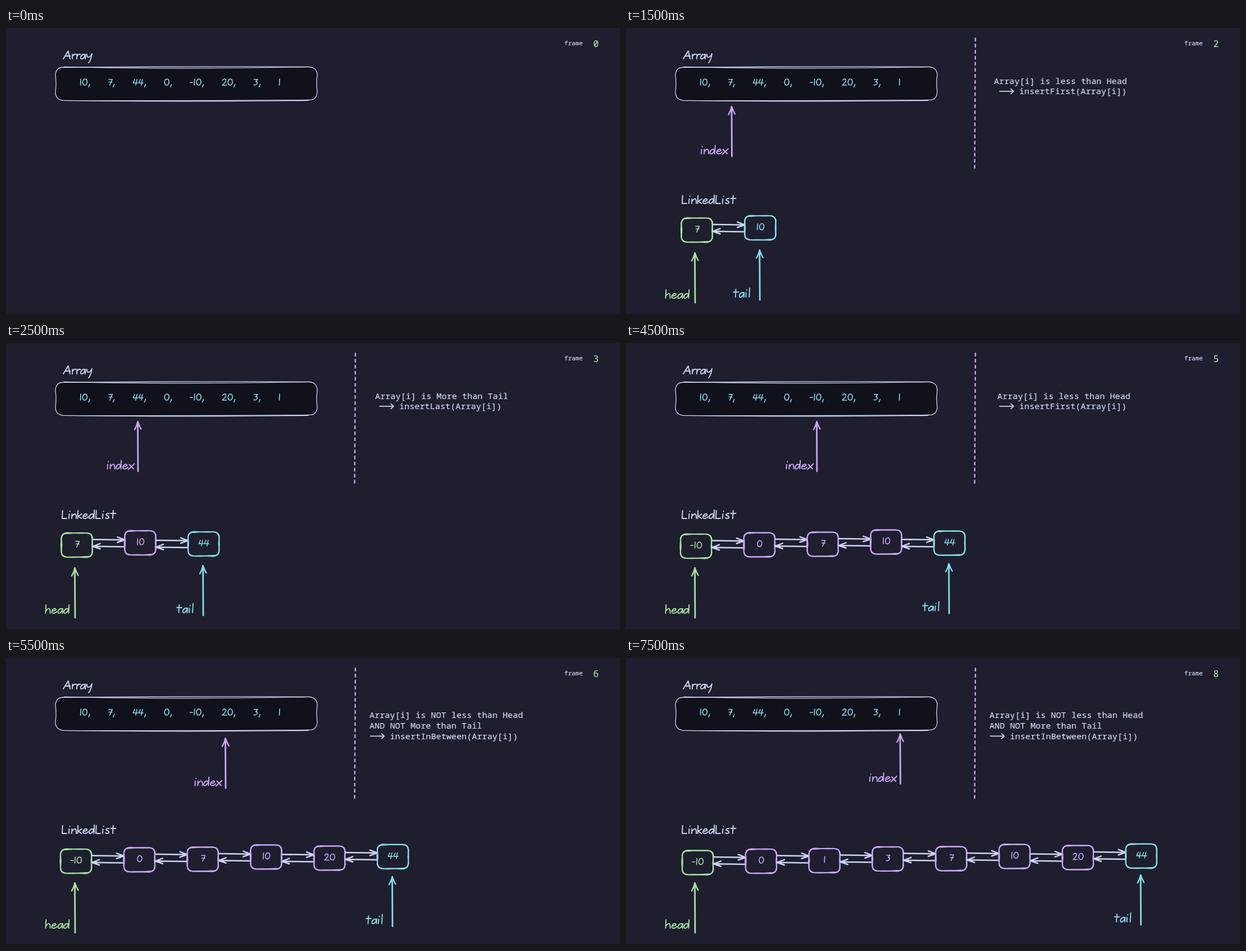
Write an HTML page that moves like this. It is 1093 px wide and 512 px high and loops after 8000 ms.

```html
<!DOCTYPE html>
<html lang="en">
<head>
<meta charset="utf-8">
<title>Array to sorted linked list</title>
<style>
  html, body { margin: 0; width: 100%; height: 100%; overflow: hidden; background: #1e1e2e; }
  svg { display: block; width: 100vw; height: 100vh; }
  path { fill: none; stroke-linecap: round; stroke-linejoin: round; }
  text { font-family: "Noto Sans Mono", "DejaVu Sans Mono", monospace; font-weight: 500; white-space: pre; }
</style>
</head>
<body>
<svg viewBox="0 0 1093 512" preserveAspectRatio="none">
  <rect width="1093" height="512" fill="#1e1e2e"/>
  <rect y="510" width="1093" height="2" fill="#181825"/>
  <g id="base"></g>
  <g id="scene"></g>
</svg>
<script>
const INK = '#cdd6f4', SKY = '#89dceb', GREEN = '#a6e3a1', MAUVE = '#cba6f7';
const LOOP = 8000, STEP = 1000, FIRST = 500;
const SMALL = 0.79, GAP = 32, PITCH = 112.8;

// Each value in array order: index arrow foot, place of the first node
// after inserting it, and the drop from its node to the next one
const items = [
  { value: 10, index: [139, 229], start: [103, 339], drift: 2 },
  { value: 7, index: [188.5, 229], start: [98.5, 339], drift: -4 },
  { value: 44, index: [235, 229], start: [98.5, 339], drift: 0 },
  { value: 0, index: [285.5, 228], start: [97.5, 339], drift: -1 },
  { value: -10, index: [340, 229], start: [97, 341], drift: -2.5 },
  { value: 20, index: [391, 232], start: [97, 341], drift: -2.7 },
  { value: 3, index: [446, 228], start: [96, 340], drift: -0.5 },
  { value: 1, index: [488.5, 224.5], start: [100, 343.5], drift: -3 }
];

// Handwriting built from shared pen strokes: [advance, path], baseline at 0
const stem = (x, h) => `M${x}-${h}L${x} 0`;
const bar = (x, y, w) => `M${x}-${y}h${w}`;
const bowl = 'M9-7Q4-10 1-4Q0 1 4 0Q8-2 9-8';
const arch = 'M1-3Q4-9 7-8Q9-7 9 0';
const glyphs = {
  A: [15, 'M1 0L9-14L13 0' + bar(4, 5, 9)],
  L: [11, stem(1, 14) + bar(1, 0, 8)],
  a: [10.5, bowl + stem(9, 8)],
  d: [12, bowl + stem(9.5, 15)],
  e: [11, 'M1-4Q8-4 8-7Q6-10 2-6Q-1 0 4 0Q8 0 10-3'],
  h: [11, stem(1, 15) + arch],
  i: [6, stem(2, 8) + 'M3-13v.5'],
  k: [9.5, stem(1, 14) + 'M8-8L2-4L8 0'],
  l: [5, stem(2, 16)],
  n: [10.5, stem(1, 8) + arch],
  r: [8, stem(2, 8) + 'M2-4Q4-9 8-8'],
  s: [9, 'M7-9Q1-9 2-6Q8-4 7-1Q4 1 1-1'],
  t: [11, stem(5, 14) + bar(1, 9, 9)],
  x: [10, 'M1-8L9 0M10-9L0 1'],
  y: [11, 'M1-8Q1-2 5-3Q8-4 10-9Q9 2 5 7'],
  0: [13, 'M6-14a5 7 0 1 0 .1 0z'],
  1: [5.5, stem(2, 14)],
  2: [12.5, 'M1-11Q4-16 8-13Q11-9 1 0h10'],
  3: [11, 'M1-13h8L5-8Q10-8 8-3Q5 1 1-1'],
  4: [12.5, 'M4-13L1-5h10M9-13L7 0'],
  7: [10, 'M1-13h8L4 0' + bar(2, 7, 7)],
  '-': [8, bar(0, 6, 6)],
  ',': [5, 'M4-2L2 4']
};

const stroke = (d, color, width, extra = '') =>
  `<path d="${d}" stroke="${color}" stroke-width="${width}" ${extra}/>`;

const mono = (x, y, str, size, color) =>
  `<text x="${x}" y="${y}" font-size="${size}" fill="${color}" stroke="${color}" stroke-width=".2">${str}</text>`;

const widthOf = str => SMALL * [...str].reduce((sum, c) => sum + glyphs[c][0], 0);

function hand(x, y, str, color, scale = 1, width = 1.9) {
  let pen = 0, out = '';
  for (const c of str) {
    const [advance, d] = glyphs[c];
    out += stroke(d, color, width / scale, `transform="translate(${pen} 0) skewX(-3)"`);
    pen += advance;
  }
  return `<g role="img" aria-label="${str}" transform="translate(${x} ${y}) scale(${scale})">${out}</g>`;
}

const number = (x, y, str, color) => hand(x, y, str, color, SMALL, 1.6);

function pointer([x, foot], label, dx, dy, color) {
  const tip = foot - 88.5;
  return stroke(`M${x} ${foot}L${x - 0.5} ${tip}`, color, 2.8) +
    stroke(`M${x - 6} ${tip + 14}Q${x - 2} ${tip + 7} ${x - 0.4} ${tip}Q${x + 2} ${tip + 7} ${x + 5.5} ${tip + 13}`, color, 2.4) +
    hand(x - dx, foot - dy, label, color);
}

function link(x1, x2, y, lean) {
  const back = x2 > x1 ? -13 : 13, tip = y + lean;
  return stroke(`M${x1} ${y}L${x2} ${tip}M${x2 + back} ${tip - 5}L${x2} ${tip}L${x2 + back} ${tip + 4.5}`, INK, 2.5);
}

// A rounded box whose sides bend by k
const box = (w, h, r, k) =>
  `M${r} ${k}Q${w / 2} ${-k} ${w - r} 0Q${w} ${k} ${w} ${r}Q${w - k * 2} ${h / 2} ${w} ${h - r}` +
  `Q${w - k} ${h} ${w - r} ${h - k}Q${w / 2} ${h + k} ${r} ${h}Q0 ${h - k} 0 ${h - r}Q${k * 2} ${h / 2} 0 ${r}Q${k} 0 ${r} ${k}Z`;

function node({ x, y, value }, color) {
  const str = String(value);
  return `<g transform="translate(${x} ${y})">` +
    stroke(box(55.5, 43, 10, 0.8), color, 2.2) + stroke(box(55, 43, 11, -0.6), color, 2) + '</g>' +
    number(x + 28.2 - widthOf(str) / 2, y + 25, str, color);
}

function note(n, value, others) {
  const call = name => `${name}(Array[i])`;
  const x = 651 + 2 * n;
  if (value < Math.min(...others)) return { x, y: 99.5, callX: 700, lines: ['Array[i] is less than Head', call('insertFirst')] };
  if (value > Math.max(...others)) return { x, y: 99.5, callX: 700, lines: ['Array[i] is More than Tail', call('insertLast')] };
  return { x: 647, y: 107.3, callX: 683.5, lines: ['Array[i] is NOT less than Head', 'AND NOT More than Tail', call('insertInBetween')] };
}

function drawNote({ x, y, callX, lines }) {
  const last = lines.length - 1, a = callX - 35, m = y + last * 18.7 - 5.3;
  return stroke('M622 18.5L620.6 256', MAUVE, 2.4, 'stroke-dasharray="4.4 6.4"') +
    lines.map((str, i) => mono(i === last ? callX : x, y + i * 18.7, str, 15.2, INK)).join('') +
    stroke(`M${a} ${m}h25m-5-4.5l5 4.5l-5 4.5`, INK, 1.6);
}

// Sort the values seen so far and chain their nodes
function chain(n) {
  let [x, y] = items[n - 1].start;
  return items.slice(0, n).sort((a, b) => a.value - b.value).map(({ value, drift }) => {
    const spot = { value, drift, x, y };
    x += PITCH;
    y += drift;
    return spot;
  });
}

function drawList(nodes) {
  return nodes.map((spot, i) => {
    const next = nodes[i + 1];
    const out = node(spot, i === 0 ? GREEN : next ? MAUVE : SKY);
    if (!next) return out;
    const right = spot.x + 56.5, y = spot.y + 11.5 + 2.7 * Math.max(0, spot.drift);
    return out + link(right, next.x, y, 0.7) + link(next.x - 0.5, right - 0.5, y + 13, -0.7);
  }).join('');
}

function draw(n) {
  let out = mono(1045.5, 33.6, n, 16, GREEN);
  if (n > 0) {
    const { value, index } = items[n - 1], nodes = chain(n), last = nodes[n - 1];
    out += hand(99, 313, 'LinkedList', INK) + drawList(nodes);
    out += pointer(index, 'index', 56.5, 4.5, MAUVE);
    out += pointer([n > 1 ? 123 : 128, 490], 'head', 53.5, 8, GREEN);
    if (n > 1) {
      out += pointer([last.x + 27, last.y + 152 - n], 'tail', 48.5, 5, SKY);
      out += drawNote(note(n, value, items.slice(0, n - 1).map(item => item.value)));
    }
  }
  scene.innerHTML = out;
}

function drawRow() {
  let x = 131;
  return items.map(({ value }, i) => {
    const str = value + (i < items.length - 1 ? ',' : ''), out = number(x, 102, str, SKY);
    x += widthOf(str) + GAP;
    return out;
  }).join('');
}

const base = document.getElementById('base');
const scene = document.getElementById('scene');

base.innerHTML =
  mono(993.8, 31, 'frame', 11, INK) +
  hand(101, 55, 'Array', INK) +
  `<g transform="translate(88 69.3)">` +
  stroke(box(466, 60, 15, 1), INK, 1.3, 'style="fill:#11111b"') +
  stroke('M15 0Q232 5 455 0M16 60Q232 63 450 60', INK, 1.2) + '</g>' +
  drawRow();

let shown = -1;
function tick() {
  const t = performance.now() % LOOP;
  const n = t < FIRST ? 0 : 1 + Math.floor((t - FIRST) / STEP);
  if (n !== shown) draw(shown = n);
  requestAnimationFrame(tick);
}
tick();
</script>
</body>
</html>
```
